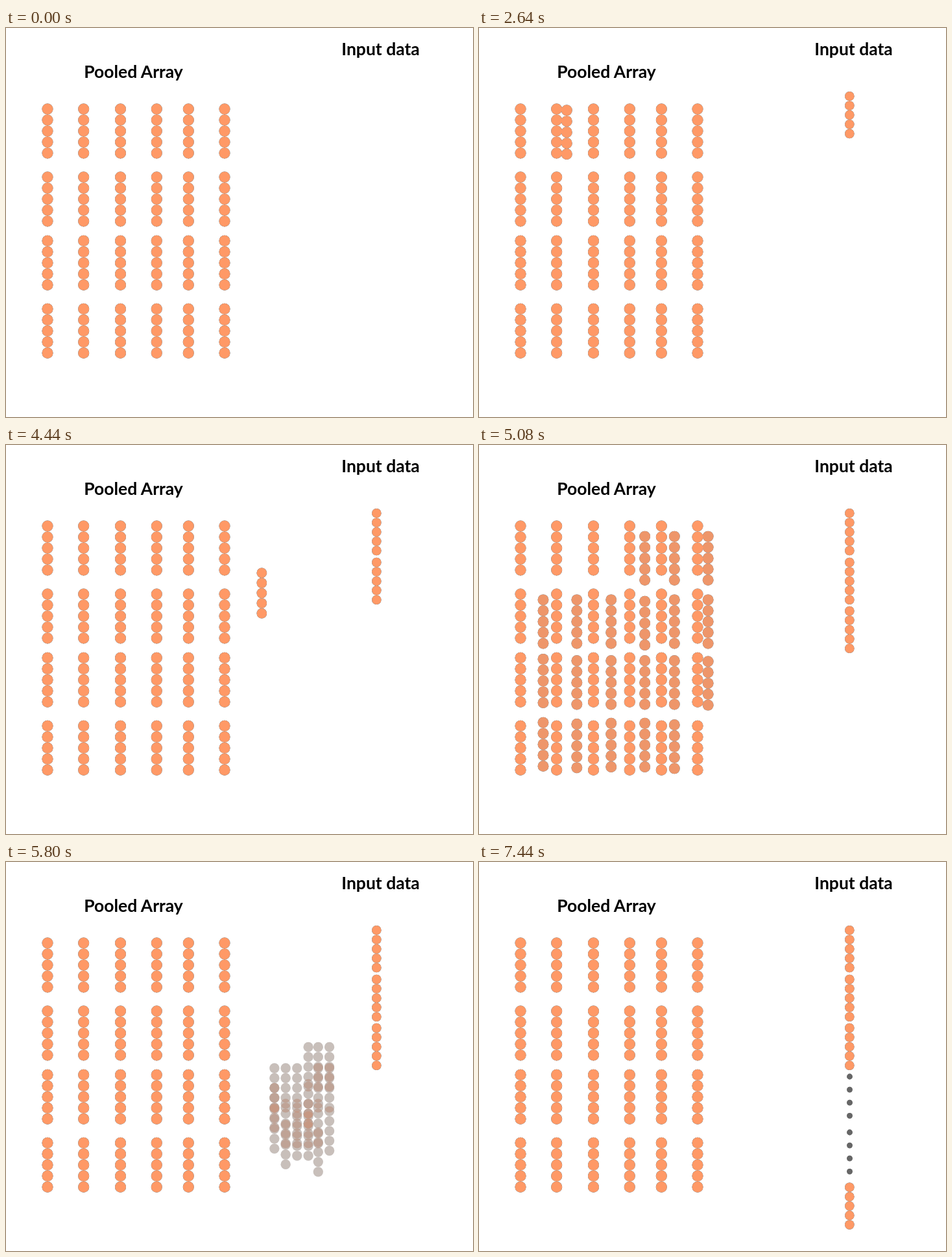
An HTML page with a canvas that plays this animation: 720x600 px, repeating every 8000 ms.

```html
<!DOCTYPE html>
<html lang="en">
<head>
<meta charset="utf-8">
<title>Pooled Array</title>
<style>
  html, body { margin: 0; width: 100%; height: 100%; overflow: hidden; background: #fff; }
  canvas, svg { position: absolute; left: 0; top: 0; width: 720px; height: 600px; }
  text { font: 700 26.5px Lato, sans-serif; text-anchor: middle; fill: #000; }
</style>
</head>
<body>
<canvas id="stage" width="720" height="600"></canvas>
<svg viewBox="0 0 720 600">
  <text x="196.5" y="77">Pooled Array</text>
  <text x="577.5" y="42">Input data</text>
</svg>
<script>
const LOOP = 8000, STEP = 40, MOVE = 1160;
const ORANGE = '#ff9966', GREY = '#666';
const COLS = [64, 119.7, 176.5, 232.3, 281.3, 337];
const ROWS = [125, 142 + 88, 328.3, 433.3];
const INPUT_X = 571.3;

// Columns that travel one at a time: [col, row, end y, start time]
const SINGLES = [
  [0, 0, 105.2, 1400],
  [1, 0, 181, 2600],
  [2, 0, 256, 3800],
  [5, 3, 501.7, 6280]
];

// Columns that travel together and fade: end y per row, 0 = none
const FADE_START = 5000, DOTS_START = 6200;
const FADING = [
  [0, 0, 0, 357.6, 357.6, 357.6],
  [357.6, 357.6, 357.6, 393, 357.6, 357.6],
  [357.6, 393, 393, 393, 393, 409.5],
  [357.6, 393, 373.5, 373.5, 409.5, 0]
];

const stage = document.getElementById('stage').getContext('2d');
const layerCanvas = document.createElement('canvas');
layerCanvas.width = 720;
layerCanvas.height = 600;
const layer = layerCanvas.getContext('2d');

const mix = (a, b, p) => a + (b - a) * p;
const progress = (t, start) => Math.min(1, Math.max(0, (t - start) / MOVE));

function disc(x, y, r, color) {
  layer.fillStyle = color;
  layer.beginPath();
  layer.arc(x, y, r, 0, Math.PI * 2);
  layer.fill();
}

// Five stacked discs, p of the way from the array to the input
function column(col, row, endY, p) {
  const x = mix(COLS[col], INPUT_X, p);
  const y = mix(ROWS[row], endY, p);
  const gap = mix(17, 14.45, p);
  const r = mix(8.5, 7.25, p);
  for (let i = 0; i < 5; i++) disc(x, y + i * gap, r, ORANGE);
}

function drawLayer(t) {
  layer.clearRect(0, 0, 720, 600);
  ROWS.forEach((y, row) => COLS.forEach((x, col) => column(col, row, y, 0)));

  for (const [col, row, endY, start] of SINGLES) {
    if (t > start) column(col, row, endY, progress(t, start));
  }

  const p = progress(t, FADE_START);
  if (p > 0 && p < 1) {
    layer.globalAlpha = 1 - p;
    FADING.forEach((ends, row) => ends.forEach((endY, col) => {
      if (endY) column(col, row, endY, p);
    }));
    layer.globalAlpha = 1;
  }

  if (t >= DOTS_START) {
    for (const top of [331, 417]) {
      for (let i = 0; i < 4; i++) disc(571.5, top + i * 20.1, 4.4, GREY);
    }
  }
}

// Colours are darkened by their own transparency, which greys edges and fades
function compose() {
  stage.globalCompositeOperation = 'source-over';
  stage.fillStyle = '#000';
  stage.fillRect(0, 0, 720, 600);
  stage.drawImage(layerCanvas, 0, 0);
  stage.globalCompositeOperation = 'destination-in';
  stage.drawImage(layerCanvas, 0, 0);
}

function frame() {
  const t = performance.now() % LOOP;
  drawLayer(Math.floor(t / STEP) * STEP);
  compose();
  requestAnimationFrame(frame);
}
frame();
</script>
</body>
</html>
```
